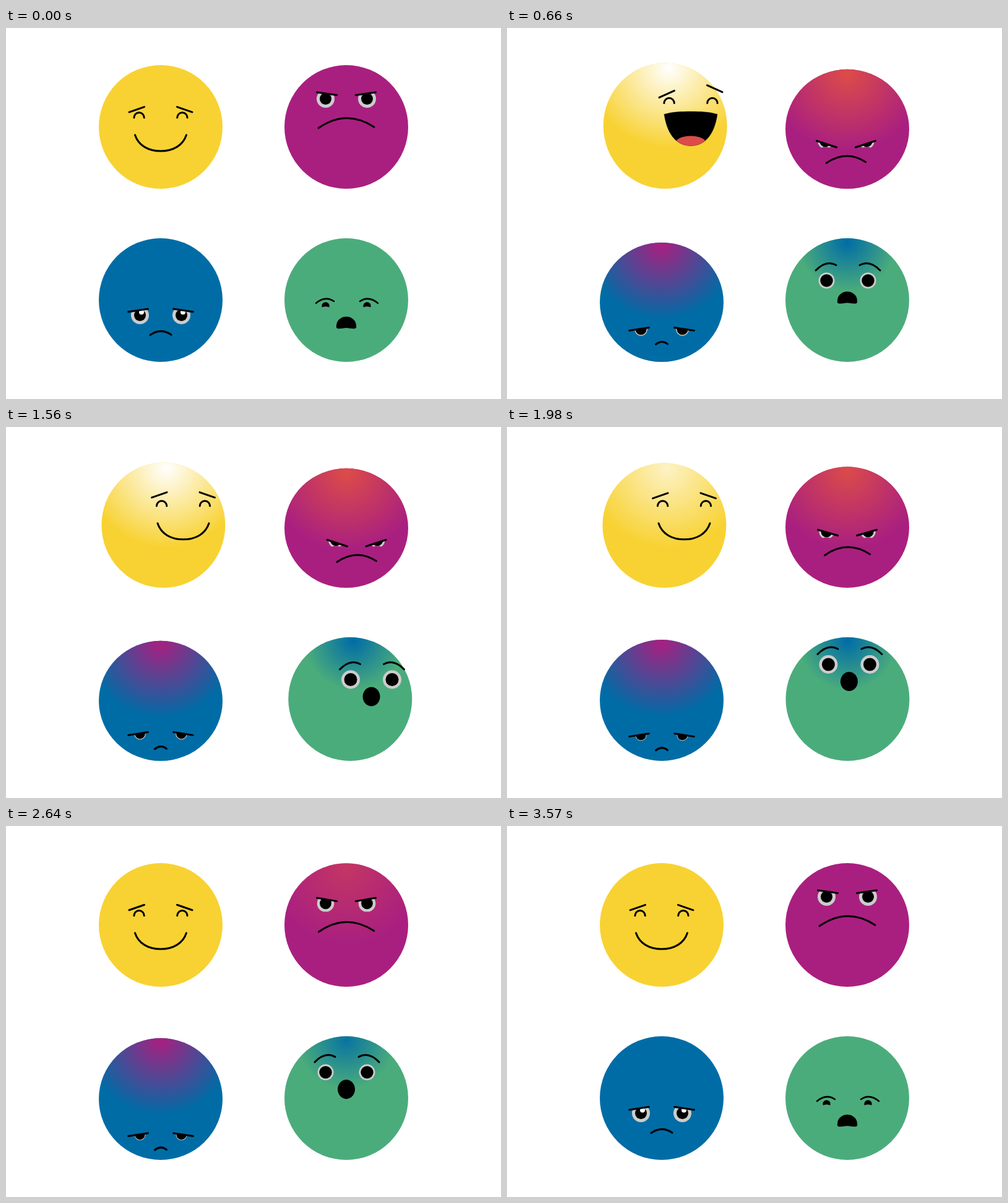
Recreate the animation shown at these times as an HTML page with a canvas. Size 800x600 px, loop 3600 ms.

```html
<!DOCTYPE html>
<html lang="en">
<head>
<meta charset="utf-8">
<title>Four moods</title>
<style>
  html, body { margin: 0; width: 100%; height: 100%; overflow: hidden; background: #fff; }
  canvas { display: block; width: 800px; height: 600px; }
</style>
</head>
<body>
<canvas id="stage" width="800" height="600"></canvas>
<script>
const LOOP = 3600;
const ctx = document.getElementById('stage').getContext('2d');
const YELLOW = '#f8d232', MAGENTA = '#a91f80', BLUE = '#006ca6', GREEN = '#4bac7b';
const RED = '#dc4c48', GREY = '#cccccc', WHITE = '#ffffff', BLACK = '#000000';
const SIDES = [-1, 1];

// ---- timing ----
const lerp = (a, b, k) => a + (b - a) * k;
const mix = (from, to, k) => from.map((v, i) => lerp(v, to[i], k));
const progress = (t, a, b) => Math.min(1, Math.max(0, (t - a) / (b - a)));

// Rises smoothly from 0 to 1 between a and b.
function ease(t, a, b) {
  const u = progress(t, a, b);
  return u * u * (3 - 2 * u);
}

// Rises from a to b, falls again from c to d.
const pulse = (t, a, b, c, d) => ease(t, a, b) - ease(t, c, d);

// Starts at 0 and eases to each [begin, end, value] in turn.
const glide = (t, ...moves) => moves.reduce((v, [a, b, to]) => lerp(v, to, ease(t, a, b)), 0);

// ---- drawing ----
function disc(x, y, rx, ry, color) {
  ctx.beginPath();
  ctx.ellipse(x, y, rx, ry, 0, 0, 7);
  ctx.fillStyle = color;
  ctx.fill();
}

function body(x, top, bottom, color, glow, glowX, glowY, radius, alpha) {
  const g = ctx.createRadialGradient(glowX, glowY, 0, glowX, glowY, radius);
  g.addColorStop(0, glow);
  g.addColorStop(1, glow + '00');
  const y = (top + bottom) / 2, ry = (bottom - top) / 2;
  disc(x, y, 100, ry, color);
  ctx.globalAlpha = alpha;
  disc(x, y, 100, ry, g);
  ctx.globalAlpha = 1;
}

function curve(x1, y1, cx, cy, x2, y2) {
  ctx.beginPath();
  ctx.moveTo(x1, y1);
  ctx.quadraticCurveTo(cx, cy, x2, y2);
  ctx.stroke();
}

function line(x1, y1, x2, y2) {
  ctx.beginPath();
  ctx.moveTo(x1, y1);
  ctx.lineTo(x2, y2);
  ctx.stroke();
}

// A symmetric mouth: corner [x, y], then each lip as [handle x, handle y, middle handle x, middle y].
function lips(x, y, [ex, ey], top, low) {
  ctx.beginPath();
  ctx.moveTo(x - ex, y + ey);
  for (const [s, [ax, ay, bx, mid]] of [[-1, top], [1, low]]) {
    ctx.bezierCurveTo(x + s * ax, y + ay, x + s * bx, y + mid, x, y + mid);
    ctx.bezierCurveTo(x - s * bx, y + mid, x - s * ax, y + ay, x - s * ex, y + ey);
  }
  ctx.closePath();
  ctx.fillStyle = BLACK;
  ctx.fill();
}

// An eyeball between an upper lid (height at both edges) and a curved lower lid.
function eye(x, y, r, pupil, lidL, lidR, cut, shine) {
  const low = y + cut;
  ctx.save();
  ctx.beginPath();
  ctx.moveTo(x - 20, lidL);
  ctx.lineTo(x + 20, lidR);
  ctx.lineTo(x + 20, low + 16);
  ctx.quadraticCurveTo(x, low - 16, x - 20, low + 16);
  ctx.clip();
  disc(x, y, r, r, GREY);
  disc(x, y, pupil, pupil, BLACK);
  if (shine) disc(x + 2.5, y - 5, 4, 4, WHITE);
  ctx.restore();
}

// Straight brows with an eye hanging below each one.
function browedEyes(cx, outer, outerY, inner, innerY, y, r, pupil, cut, shine) {
  const slope = (innerY - outerY) / (outer - inner);
  const lid = d => outerY + (outer - d) * slope;
  for (const s of SIDES) {
    eye(cx + s * 33.5, y, r, pupil, lid(33.5 - s * 20), lid(33.5 + s * 20), cut, shine);
    line(cx + s * outer, outerY, cx + s * inner, innerY);
  }
}

// ---- moods ----
function joy(t) {
  const dx = glide(t, [40, 500, 47], [680, 1040, -42], [1140, 1520, 36.5], [2020, 2600, 0]);
  const dy = glide(t, [40, 500, -23.5], [680, 1040, -41.5], [1140, 1520, -17.2], [2020, 2600, 0]);
  const glow = pulse(t, 40, 480, 1600, 2700);
  const open = pulse(t, 180, 480, 1150, 1430);
  const x = 250 + dx, y = 186 + dy;
  const top = 60 - 2.5 * glow - 0.02 * dx * open;
  body(250 + dx * 0.12, top, 260, YELLOW, WHITE, 250 + dx * 0.25, top + 8, 130, glow);

  const tilt = open * dx / 45;
  const steep = 8.5 - 2 * open + 4.3 * tilt;
  for (const s of SIDES) {
    const brow = y - 54.2 - 4.8 * glow - open - s * 4.2 * tilt;
    line(x + s * 51, brow + steep / 2, x + s * 26.5, brow - steep / 2);
    ctx.beginPath();
    ctx.arc(x + s * 34.9, y - 41, 8.2, Math.PI, 0);
    ctx.stroke();
  }

  const smile = [36, 4, 20, 13];
  lips(x, y, mix([41.5, -13], [43, -23], open),
    mix(smile, [30, -27, 15, -27.5], open), mix(smile, [39, 5, 26, 28], open));
  ctx.save();
  ctx.lineWidth = lerp(3, 0.3, open);
  ctx.stroke();
  ctx.clip();
  if (open) disc(x, y + lerp(13, 24, open), 25, 12 * open, RED);
  ctx.restore();
}

function anger(t) {
  const x = 550 + glide(t, [60, 400, -36], [400, 940, 35.5], [1150, 1940, 0]);
  const slump = pulse(t, 40, 500, 1560, 3000);
  const press = slump ** 2, squint = 1 - (1 - slump) ** 2;
  const top = 60 + 6.8 * press;
  body(550, top, 260, MAGENTA, RED, 550, top + 7, 125, pulse(t, 40, 500, 1800, 3500));
  browedEyes(x, 47.5, 104 + 78.5 * slump, 15.3, 108.5 + 84.5 * slump,
    114.5 + 69 * slump, 14.5 - 2.5 * squint, 9.5 - 0.5 * squint, 15 - 6.4 * squint);
  const half = 45 - 13.3 * press, rise = 15.3 - 4.8 * press, peak = 145.7 + 61.3 * slump;
  curve(x - half, peak + rise + 0.8, x, peak - rise, x + half, peak + rise - 0.8);
}

function sadness(t) {
  const stay = 1 - ease(t, 2700, 3520);
  const shut = ease(t, 40, 600) * stay;
  const sink = (1 - (1 - progress(t, 640, 2500)) ** 2) * stay;
  const top = 340 + 7 * shut - 4 * sink ** 4;
  body(250, top, 540, BLUE, MAGENTA, 250, top + 4, 120, shut);
  const brow = 459 + 30 * shut + 12.6 * sink;
  browedEyes(250, 52.3, brow, 20.6, brow - 4.8, 464.5 + 22.5 * shut + 12.4 * sink,
    14.5 - 4 * shut - 1.6 * sink, 9.5 - 0.5 * shut - sink, 20, true);
  const half = 17 - 7.5 * shut, rise = 6 - 2 * shut, peak = 490.5 + 16.8 * shut + 12.7 * sink;
  curve(250 - half, peak + rise, 250, peak - rise, 250 + half, peak + rise - 0.4);
}

function fear(t) {
  const dx = glide(t, [680, 1020, -38.8], [1140, 1500, 40.5], [1680, 2040, 0]);
  const open = pulse(t, 40, 500, 2660, 3520);
  const round = pulse(t, 680, 1000, 2660, 3520);
  const shock = pulse(t, 1140, 1500, 2000, 2640);
  const jump = 24.5 * pulse(t, 1680, 1980, 2000, 3150);
  const x = 550 + dx;
  body(550 + dx * 0.155, 340, 540, GREEN, BLUE, 550 + dx * 0.3, 346, 80, pulse(t, 40, 500, 2400, 3520));

  const y = 449.5 - 41 * open - jump, brow = 445 - 53 * open - jump;
  ctx.lineWidth = 2.5 + 0.5 * open;
  for (const s of SIDES) {
    eye(x + s * 33.5, y, 6 + 7 * open + 2 * shock, 6.2 + 4 * open + 0.3 * shock, y - 40, y - 40, 1 + 19 * open);
    curve(x + 1 + s * (50 + 2 * open), brow, x + 1 + s * 35, brow - 12.5 - 5 * open,
      x + 1 + s * (21 - 2 * open), brow - 3 - 5.5 * open);
  }
  lips(x, 476.5 - 40.5 * open - jump, mix([16, 5], [14, 0], round),
    mix([16, -3.5, 8.5, -9.7], [14, -8.6, 7.7, -15.6], round),
    mix([18, 13, 6, 8.4], [14, 8.6, 7.7, 15.6], round));
}

const start = performance.now();

function draw() {
  const t = (performance.now() - start) % LOOP;
  ctx.fillStyle = WHITE;
  ctx.fillRect(0, 0, 800, 600);
  ctx.strokeStyle = BLACK;
  ctx.lineCap = ctx.lineJoin = 'round';
  for (const mood of [joy, anger, sadness, fear]) {
    ctx.lineWidth = 3;
    mood(t);
  }
  requestAnimationFrame(draw);
}
draw();
</script>
</body>
</html>
```
